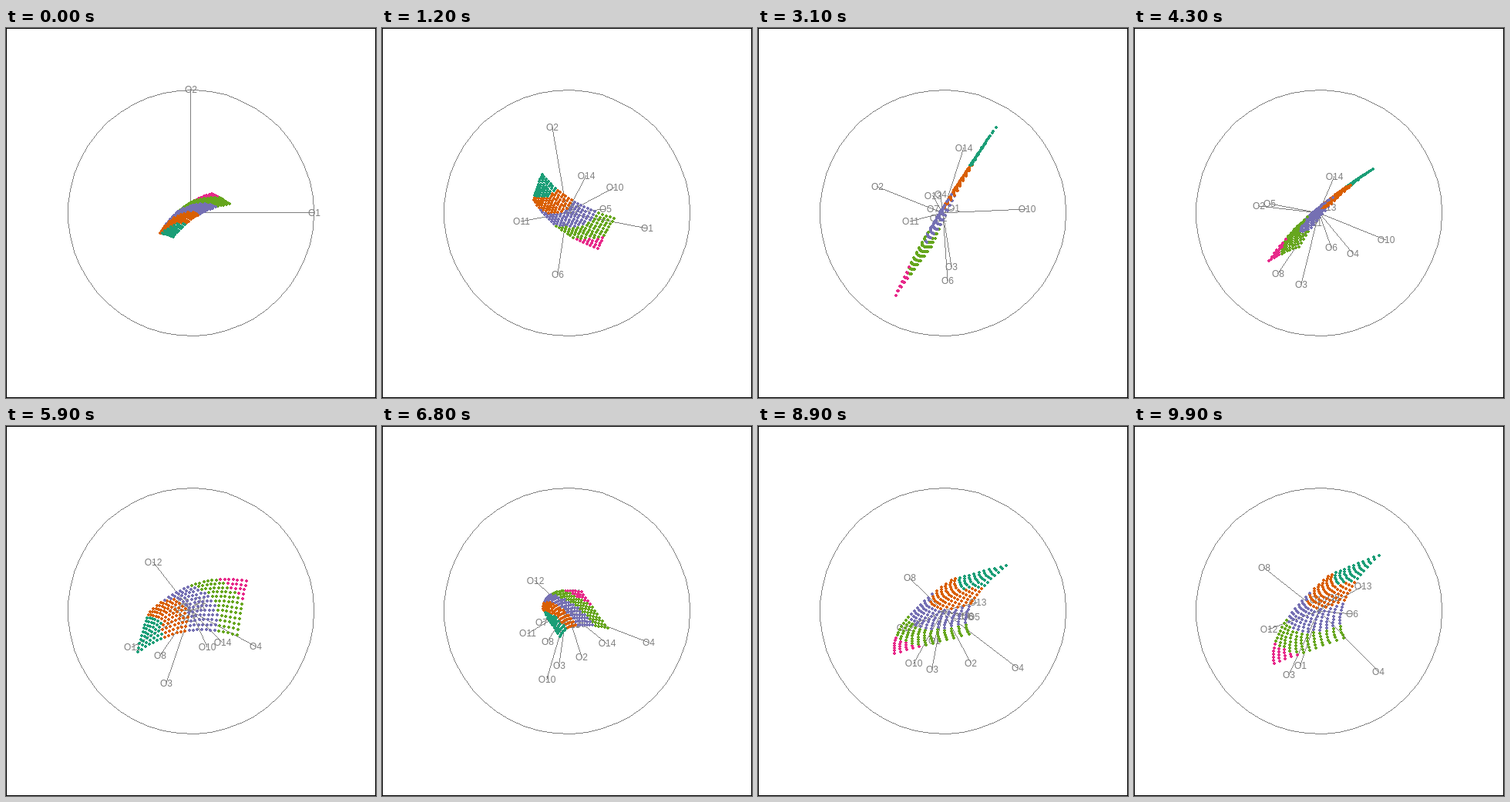
Animation of 480 by 480 pixels, one loop 10 s. Source, as an HTML page with a canvas:

```html
<!DOCTYPE html>
<html lang="en">
<head>
<meta charset="utf-8">
<title>Tour</title>
<style>
html, body { margin: 0; width: 100%; height: 100%; overflow: hidden; background: #fff; }
canvas { display: block; }
</style>
</head>
<body>
<canvas id="stage" width="480" height="480"></canvas>
<script>
const ctx = document.getElementById('stage').getContext('2d');
const SIZE = 480, MID = 239.4, RADIUS = 159.5, LOOP = 10000, STEP = 100;
const AXES = 14, ACROSS = 12, ALONG = 25;
const GREY = '#7f7f7f';
const BANDS = ['#e7298a', '#66a61e', '#7570b3', '#d95f02', '#1b9e77'];

// Views the tour passes through: the three directions that span the curved
// sheet, and the long axes by number. All are offsets from the centre.
const poses = [
  { time: 0, across: [10, 4.5], along: [-35, 23.5], bend: [5, 7],
    long: { 1: [160, 0], 2: [0, -160] } },
  { time: 1200, across: [8, -18], along: [-44, -30], bend: [9, -5],
    long: { 1: [104, 20], 2: [-19, -111], 5: [50, -5], 6: [-12, 80], 10: [62, -33], 11: [-59, 11], 14: [25, -48] } },
  { time: 3100, across: [21, -30], along: [44, -79], bend: [8, -5],
    long: { 2: [-85, -34], 3: [11, 70], 6: [6, 88], 10: [109, -5], 11: [-42, 11], 14: [27, -84] } },
  { time: 4300, across: [17.5, -10.5], along: [50, -49], bend: [6, 5],
    long: { 2: [-78, -9], 3: [-23, 93], 4: [44, 53], 5: [-64, -12], 6: [16, 45], 8: [-53, 79], 10: [87, 35], 14: [20, -47] } },
  { time: 5900, across: [-7, 30.5], along: [-63.5, 15.5], bend: [3, 16],
    long: { 3: [-32, 94], 4: [84, 46], 8: [-40, 58], 10: [21, 47], 11: [-76, 47], 12: [-49, -63], 14: [41, 41] } },
  { time: 7800, across: [32, 1], along: [22.5, -4], bend: [15, -2],
    long: { 2: [44, 113], 4: [88, 17], 5: [50, 29], 7: [-55, 33], 10: [-68, 96], 14: [43, 25] } },
  { time: 9900, across: [39, -15], along: [29, -55], bend: [22, -5],
    long: { 1: [-24, 71], 3: [-39, 83], 4: [77, 79], 6: [43, 4], 8: [-71, -56], 12: [-65, 24], 13: [57, -32] } }
];

let seed = 7;
const random = () => (seed = seed * 16807 % 2147483647) / 2147483647;

// Axes without a long tip stay near the centre, spreading as the tour sets off
function shortTip(time) {
  const angle = random() * 2 * Math.PI;
  const length = 28 * random() * Math.min(1, time / 3000);
  return [length * Math.cos(angle), length * Math.sin(angle)];
}
for (const pose of poses) {
  pose.tips = Array.from({ length: AXES }, (_, i) => pose.long[i + 1] || shortTip(pose.time));
  pose.sheet = [pose.across, pose.along, pose.bend];
}

const mix = (a, b, k) => a + (b - a) * k;
const mixAll = (p, q, k) => p.map(([x, y], i) => [mix(x, q[i][0], k), mix(y, q[i][1], k)]);
const norm = (pts, d) => Math.hypot(...pts.map(p => p[d]));

// Blend two poses and keep the length of the projection, as a rotation does
function poseAt(time) {
  let i = 0;
  while (i < poses.length - 2 && time >= poses[i + 1].time) i++;
  const a = poses[i], b = poses[i + 1];
  const k = (time - a.time) / (b.time - a.time);
  const tips = mixAll(a.tips, b.tips, k);
  const scale = [0, 1].map(d => mix(norm(a.tips, d), norm(b.tips, d), k) / norm(tips, d));
  const place = ([x, y]) => [x * scale[0], y * scale[1]];
  return { tips: tips.map(place), sheet: mixAll(a.sheet, b.sheet, k).map(place) };
}

// A regular grid on a quadratic sheet, coloured by distance from one corner
const dots = [];
for (let j = 0; j < ALONG; j++) {
  for (let i = 0; i < ACROSS; i++) {
    const u = i / (ACROSS - 1), v = j / (ALONG - 1);
    const s = 2 * u - 1, t = 2 * v - 1;
    const level = v + .8 * u - .43 * u * u;
    const band = Math.min(4, Math.floor((level + .02) / .285));
    dots.push({ color: BANDS[band], w: [s, t, t * t + .15 * s * s - .28 * s * t] });
  }
}
const meanBend = dots.reduce((sum, dot) => sum + dot.w[2], 0) / dots.length;
for (const dot of dots) dot.w[2] -= meanBend;

// Crisp one-pixel line
function line(x0, y0, x1, y1) {
  const n = Math.ceil(Math.max(Math.abs(x1 - x0), Math.abs(y1 - y0)));
  for (let i = 0; i <= n; i++) {
    ctx.fillRect(Math.round(mix(x0, x1, i / n)), Math.round(mix(y0, y1, i / n)), 1, 1);
  }
}

function drawFrame() {
  ctx.fillStyle = '#fff';
  ctx.fillRect(0, 0, SIZE, SIZE);
  ctx.strokeRect(.5, .5, SIZE - 1, SIZE - 1);
  ctx.fillStyle = GREY;
  const rim = i => {
    const a = i / 49 * 2 * Math.PI;
    return [Math.round(MID + RADIUS * Math.cos(a)), Math.round(MID - RADIUS * Math.sin(a))];
  };
  for (let i = 0; i < 49; i++) line(...rim(i), ...rim(i + 1));
}

function drawAxes(tips) {
  ctx.font = '12px "Liberation Sans", Arial, sans-serif';
  ctx.textAlign = 'center';
  tips.forEach(([x, y], i) => {
    if (Math.hypot(x, y) < 8) return;
    line(MID, MID, MID + x, MID + y);
    ctx.fillText('O' + (i + 1), Math.round(240 + x), Math.round(240 + y) + 4);
  });
}

function drawDots(sheet) {
  for (const { color, w } of dots) {
    const [x, y] = [0, 1].map(d => Math.round(240 + w.reduce((sum, k, n) => sum + k * sheet[n][d], 0)));
    ctx.fillStyle = color;
    ctx.fillRect(x - 2, y - 1, 4, 2);
    ctx.fillRect(x - 1, y - 2, 2, 4);
  }
}

function draw() {
  const time = Math.floor(performance.now() % LOOP / STEP) * STEP;
  const { tips, sheet } = poseAt(time);
  drawFrame();
  drawAxes(tips);
  drawDots(sheet);
  requestAnimationFrame(draw);
}
draw();
</script>
</body>
</html>
```
